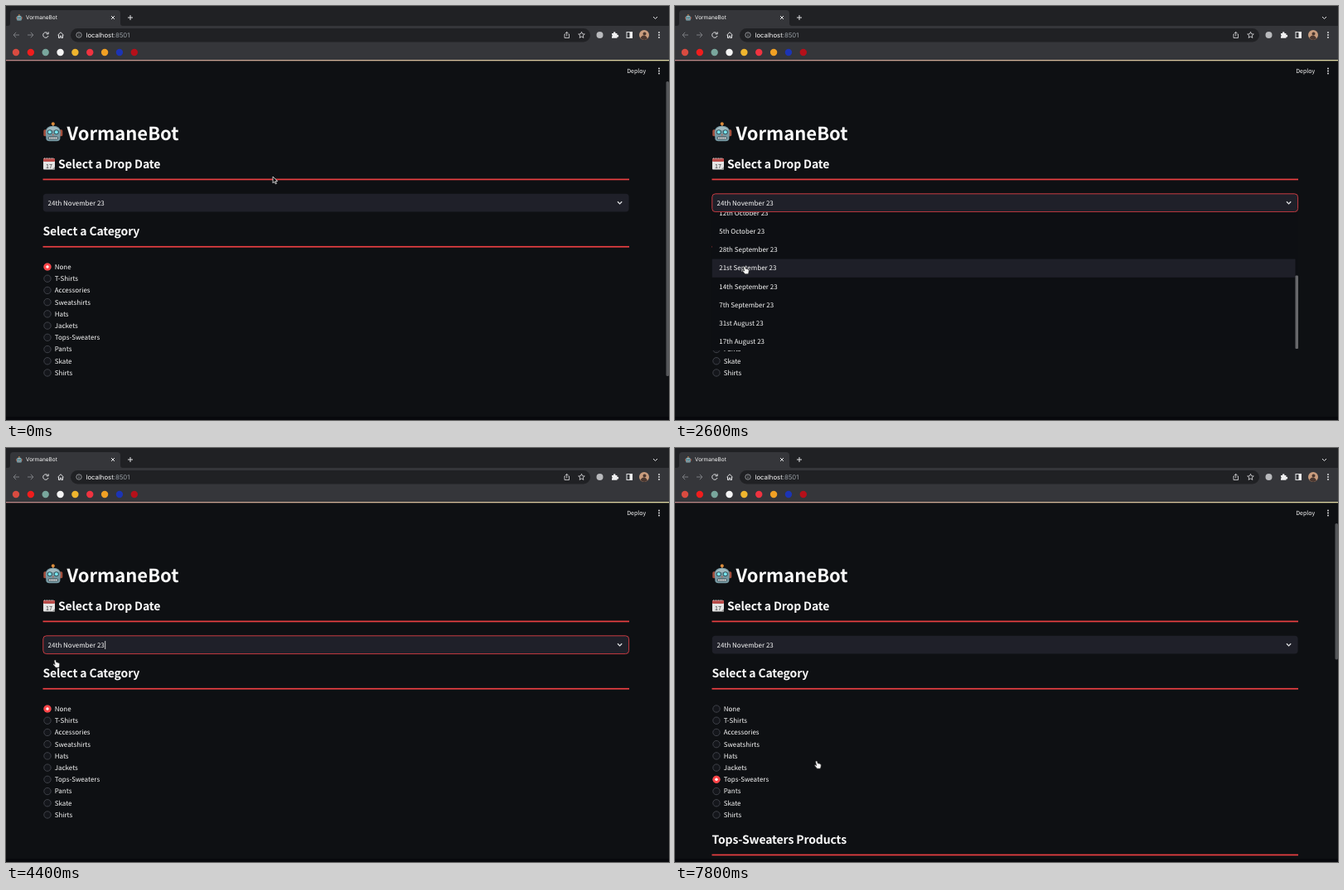
An HTML page that plays this animation: 800x500 px, repeating every 8000 ms.

```html
<!DOCTYPE html>
<html lang="en">
<head>
<meta charset="utf-8">
<title>VormaneBot</title>
<style>
  html, body { margin: 0; width: 100%; height: 100%; overflow: hidden; background: #0e1013; }
  body { display: flex; }
  text {
    font: 500 8px "Noto Sans CJK JP", "Noto Sans CJK SC", "Noto Sans CJK", sans-serif;
    fill: #fafafa; text-rendering: geometricPrecision; white-space: pre;
  }
  .ui { font-family: Inter, Roboto, sans-serif; font-weight: 400; }
  .title { font-size: 22px; font-weight: 700; }
  .heading { font-size: 14px; font-weight: 600; letter-spacing: -.01em; }
  .status { font-size: 7px; }
  .line { fill: none; stroke: #e2e3e5; stroke-width: 1; }
  .dim { stroke: #7b7d81; }
  .rule { fill: #e93f42; }
</style>
</head>
<body>
<svg width="800" height="500" viewBox="0 0 800 500">
  <defs>
    <linearGradient id="stripe">
      <stop offset="0" stop-color="#b98586"/>
      <stop offset=".5" stop-color="#d3b49a"/>
      <stop offset="1" stop-color="#e0d9a4"/>
    </linearGradient>
    <g id="robot">
      <path d="M11.5 2v5" stroke="#a6764f" stroke-width="1.6"/>
      <circle cx="11.5" cy="2" r="2" fill="#d98a3a"/>
      <rect y="9" width="4" height="8" rx="1.6" fill="#a34f3d"/>
      <rect x="19" y="9" width="4" height="8" rx="1.6" fill="#a34f3d"/>
      <path d="M2.5 12Q2.5 4.500 11.500 4.500T20.500 12L20 20Q19.500 23 16 23H7Q3.500 23 3 20Z" fill="#7699a3"/>
      <path d="M4 10Q5 5.500 11.500 5.500T19 10Z" fill="#9fb9bf"/>
      <circle cx="7.500" cy="12" r="3" fill="#37545c"/>
      <circle cx="15.500" cy="12" r="3" fill="#37545c"/>
      <circle cx="7.500" cy="12" r="2" fill="#78e5ee"/>
      <circle cx="15.500" cy="12" r="2" fill="#78e5ee"/>
      <path d="M10.500 16l1-2 1 2Z" fill="#c4573f"/>
      <rect x="5.500" y="17.300" width="12" height="3.700" rx="1.500" fill="#3a4b52"/>
      <path d="M6.500 19.200h10" stroke="#eee" stroke-width="2" stroke-dasharray="1.600 .5"/>
    </g>
  </defs>

  <!-- Browser tabs and address bar -->
  <rect width="800" height="66" fill="#35363a"/>
  <rect width="800" height="24" fill="#202124"/>
  <path d="M2 24Q5 24 5 21V9Q5 5 9 5H134Q138 5 138 9V21Q138 24 141 24Z" fill="#35363a"/>
  <use href="#robot" transform="translate(12 10) scale(.34)"/>
  <text class="ui" x="24" y="16.400" style="font-size:6.500px">VormaneBot</text>
  <g class="line">
    <path d="M127 12l4 4m0-4l-4 4M147 14h6m-3-3v6M781 13l2.500 2.500L786 13"/>
    <path class="dim" d="M16 35H9m3.200-3.200L9 35l3.200 3.200M26 35h7m-3.200-3.200L33 35l-3.200 3.200"/>
    <path d="M50.400 33A3.200 3.200 0 1 0 51 36M51.200 31.400v2.400h-2.600M62.500 35.300L66 31.700l3.500 3.600M63.500 35v3.500h1.700v-2.300h1.600v2.300h1.700V35"/>
  </g>
  <rect x="78" y="27" width="627" height="16.500" rx="8.250" fill="#202124"/>
  <g class="line" style="stroke-width:.8">
    <circle cx="88" cy="35" r="3.200" stroke="#aaacb0"/>
    <path d="M88 34.500v2.200M88 32.800v.8" stroke="#aaacb0"/>
    <path d="M675 34h-1v4.500h5.500V34h-1M676.700 36.500v-5m-1.600 1.500l1.600-1.700 1.600 1.700"/>
    <path d="M694.500 31.300l1.100 2.500 2.700.2-2.100 1.800.7 2.600-2.400-1.400-2.400 1.400.7-2.600-2.100-1.800 2.700-.2Z"/>
    <rect x="749" y="31.500" width="6.500" height="7" stroke-width="1"/>
  </g>
  <text class="ui" x="96.500" y="37.800" style="font-size:7.780px">localhost<tspan fill="#9aa0a6">:8501</tspan></text>
  <circle cx="716.500" cy="35" r="4" fill="#b9babd"/>
  <path d="M731 33h2a1.300 1.300 0 1 1 2.400 0h2v2a1.300 1.300 0 1 1 0 2.400v1.400h-6.400v-2a1.300 1.300 0 0 0 0-2.200Z" fill="#f1f1f2"/>
  <rect x="752.500" y="31.500" width="3" height="7" fill="#f1f1f2"/>
  <circle cx="770" cy="35" r="6" fill="#c99d7e"/>
  <path d="M765.500 39Q767 35 770 35.500T774 39.500Q770 42.500 765.500 39Z" fill="#4b3830"/>
  <circle cx="770.500" cy="33.500" r="2" fill="#4b3830"/>
  <g id="bookmarks"></g>

  <!-- Page -->
  <rect y="66" width="800" height="434" fill="#0e1013"/>
  <rect y="65" width="800" height="1.300" fill="url(#stripe)"/>
  <rect y="496" width="800" height="4" fill="#08090d"/>
  <g id="menuDots" fill="#e8e9ea"></g>
  <text class="status" x="749.300" y="81">Deploy</text>
  <g id="running">
    <g class="line" style="stroke:#75777c;stroke-width:.9">
      <circle cx="656" cy="80.800" r="2.800"/>
      <circle cx="664" cy="80.800" r="2.800"/>
      <path d="M660 82v-3l-2.300-2 2.500-2.400 1.800 2h2.400"/>
      <circle cx="662" cy="73.300" r=".8"/>
    </g>
    <text class="status" x="671.500" y="81" style="fill:#7f8186">RUNNING...</text>
    <text class="status" x="720" y="81">Stop</text>
  </g>
  <rect id="pageBar" x="796.500" y="91" width="3.500" rx="1.500" fill="#55575a"/>

  <use href="#robot" x="45.300" y="140.300"/>
  <text class="title" x="73.500" y="161.500">VormaneBot</text>
  <g>
    <rect x="45" y="184" width="14" height="13.500" rx="1" fill="#e4e4e4"/>
    <rect x="45" y="184" width="14" height="4" rx="1" fill="#b84a48"/>
    <path d="M46 184h12" stroke="#ddd" stroke-width="1.600" stroke-dasharray=".8 1.200"/>
    <path d="M55.500 197.500l3.500-3.500v3.500Z" fill="#999"/>
    <text x="48" y="195.500" style="font-size:7px;fill:#333">17</text>
  </g>
  <text class="heading" x="63" y="195.800">Select a Drop Date</text>
  <rect class="rule" x="44.500" y="208.600" width="707.500" height="1.700"/>
  <rect id="select" x="44.800" y="226.800" width="706.800" height="21.800" rx="4" fill="#1f2029"/>
  <text x="50.500" y="240.800">24th November 23</text>
  <path id="caret" d="M119.700 233v10" stroke="#fafafa" stroke-width=".8"/>
  <path class="line" d="M738 236.300l2.600 2.600 2.600-2.600" style="stroke-width:1.300"/>
  <text class="heading" x="44.500" y="277">Select a Category</text>
  <rect class="rule" x="44.500" y="289.900" width="707.500" height="1.700"/>
  <g id="radios"></g>
  <g id="products">
    <text class="heading" x="44.500" y="478">Tops-Sweaters Products</text>
    <rect class="rule" x="44.500" y="490.600" width="707.500" height="1.700"/>
  </g>

  <g id="menu">
    <svg x="44.500" y="249" width="707.500" height="167">
      <rect width="707.500" height="167" fill="#0d0f13"/>
      <rect id="highlight" width="704" height="22.220"/>
      <g id="options"></g>
      <rect id="menuBar" x="704" width="3.500" height="88.500" rx="1" fill="#66676a"/>
    </svg>
  </g>

  <path id="arrow" d="M0 0v7.800l1.900-1.700 1.300 2.800 1.300-.6-1.300-2.700 2.500-.1Z" fill="#111" stroke="#eee" stroke-width=".8"/>
  <path id="hand" d="M-1.700-4.400Q-.8-5 -.3-4L.4-1.600Q1.300-2.200 1.800-1.300 2.700-1.700 3.100-.8 4.200-1 4.300.4L4 3 3.300 4.800H-.5L-3.500 1.200Q-4 .2-2.900 0L-1.400 1-2.400-3Q-2.500-4-1.700-4.400Z" fill="#f4f4f4" stroke="#222" stroke-width=".7"/>
</svg>

<script>
const LOOP = 8000, STEP = 200;
const ROW = 22.22, MAX_SCROLL = 143.4, BAR_TRAVEL = 75.5;
const RADIO_TOP = 315, RADIO_GAP = 14.22, PICKED = 6;
const categories = ["None", "T-Shirts", "Accessories", "Sweatshirts", "Hats", "Jackets",
  "Tops-Sweaters", "Pants", "Skate", "Shirts"];
const dates = ["24th November", "16th November", "9th November", "2nd November", "26th October",
  "19th October", "12th October", "5th October", "28th September", "21st September",
  "14th September", "7th September", "31st August", "17th August"];
const bookmarkColors = ["#d94b40", "#f01d1d", "#79a79d", "#f4f4f4", "#efb52e", "#ef3340",
  "#f0a024", "#1c34b4", "#b5101a"];

// Tracks are [time, value, ...] stops with eased motion between them.
const pointerTrack = [[200, 322, 206], [1000, 88, 238], [1200, 85, 250], [1400, 85, 304],
  [1600, 85, 319], [3200, 85, 319], [3800, 60.5, 260.5], [4400, 60.5, 260.5], [5800, 49.5, 401],
  [6600, 49.5, 401], [7600, 172, 382.5]];
const scrollTrack = [[1600, 0], [2400, MAX_SCROLL], [2600, MAX_SCROLL], [3200, 0]];

const $ = id => document.getElementById(id);
const show = (id, visible) => $(id).setAttribute("display", visible ? "inline" : "none");
const set = (id, attrs) => Object.entries(attrs).forEach(([k, v]) => $(id).setAttribute(k, v));

function sample(track, t) {
  const next = track.findIndex(stop => stop[0] > t);
  if (next === 0) return track[0].slice(1);
  if (next < 0) return track.at(-1).slice(1);
  const [start, ...from] = track[next - 1], [end, ...to] = track[next];
  const p = (t - start) / (end - start), eased = p * p * (3 - 2 * p);
  return from.map((v, i) => v + (to[i] - v) * eased);
}

$("bookmarks").innerHTML = bookmarkColors.map((color, i) =>
  `<circle cx="${12 + i * 17.85}" cy="56" r="4.2" fill="${color}"/>`).join("");
$("menuDots").innerHTML = [35, 78.5].flatMap(y => [y - 3, y, y + 3])
  .map(y => `<circle cx="788" cy="${y}" r=".9"/>`).join("");

$("radios").innerHTML = categories.map((name, i) => {
  const y = RADIO_TOP + i * RADIO_GAP;
  return `<circle cx="50" cy="${y}" r="4.2" fill="#14161b" stroke="#4a4c53" stroke-width=".8"/>
    <text x="58.7" y="${y + 2.9}">${name}</text>`;
}).join("") + `<g id="picked"><circle cx="50" r="4.6" fill="#ff4346"/><circle cx="50" r="1.7" fill="#fff"/></g>`;

$("options").innerHTML = dates.map((date, i) =>
  `<text x="8.7" y="${(i + .5) * ROW + 2.7}">${date} 23</text>`).join("");

function draw(t) {
  const [x, y] = sample(pointerTrack, t);
  const [scroll] = sample(scrollTrack, t);
  const open = t >= 1000 && t < 4200;
  const focused = t >= 1000 && t < 6200;
  const arrow = t < 800 || (t >= 4600 && t < 5200);

  show("menu", open);
  const stale = t >= 2800 && t < 3400;
  const hovered = t < 1600 ? 0 : stale ? 2 : Math.floor((y - 249 + scroll) / ROW);
  set("highlight", { y: hovered * ROW - scroll, fill: stale ? "#1b1d21" : "#1e1f28" });
  set("options", { transform: `translate(0 ${-scroll})` });
  set("menuBar", { y: 1 + scroll / MAX_SCROLL * BAR_TRAVEL });

  set("select", { stroke: focused ? "#c63a40" : "none" });
  const blink = (t >= 4200 ? t - 4200 : t) % 1000;
  show("caret", focused && blink < 400);

  const choice = t >= 6200 ? PICKED : 0;
  set("picked", { transform: `translate(0 ${RADIO_TOP + choice * RADIO_GAP})` });
  show("running", t >= 6400 && t < 7600);
  show("products", t >= 7600);
  show("pageBar", t < 1400 || t >= 4600);
  set("pageBar", { height: t >= 7600 ? 164.5 : 356 });

  show("arrow", arrow);
  show("hand", !arrow);
  set(arrow ? "arrow" : "hand", { transform: `translate(${x} ${y})` });
}

function tick() {
  const t = performance.now() % LOOP;
  draw(Math.floor(t / STEP) * STEP);
  requestAnimationFrame(tick);
}
tick();
</script>
</body>
</html>
```
